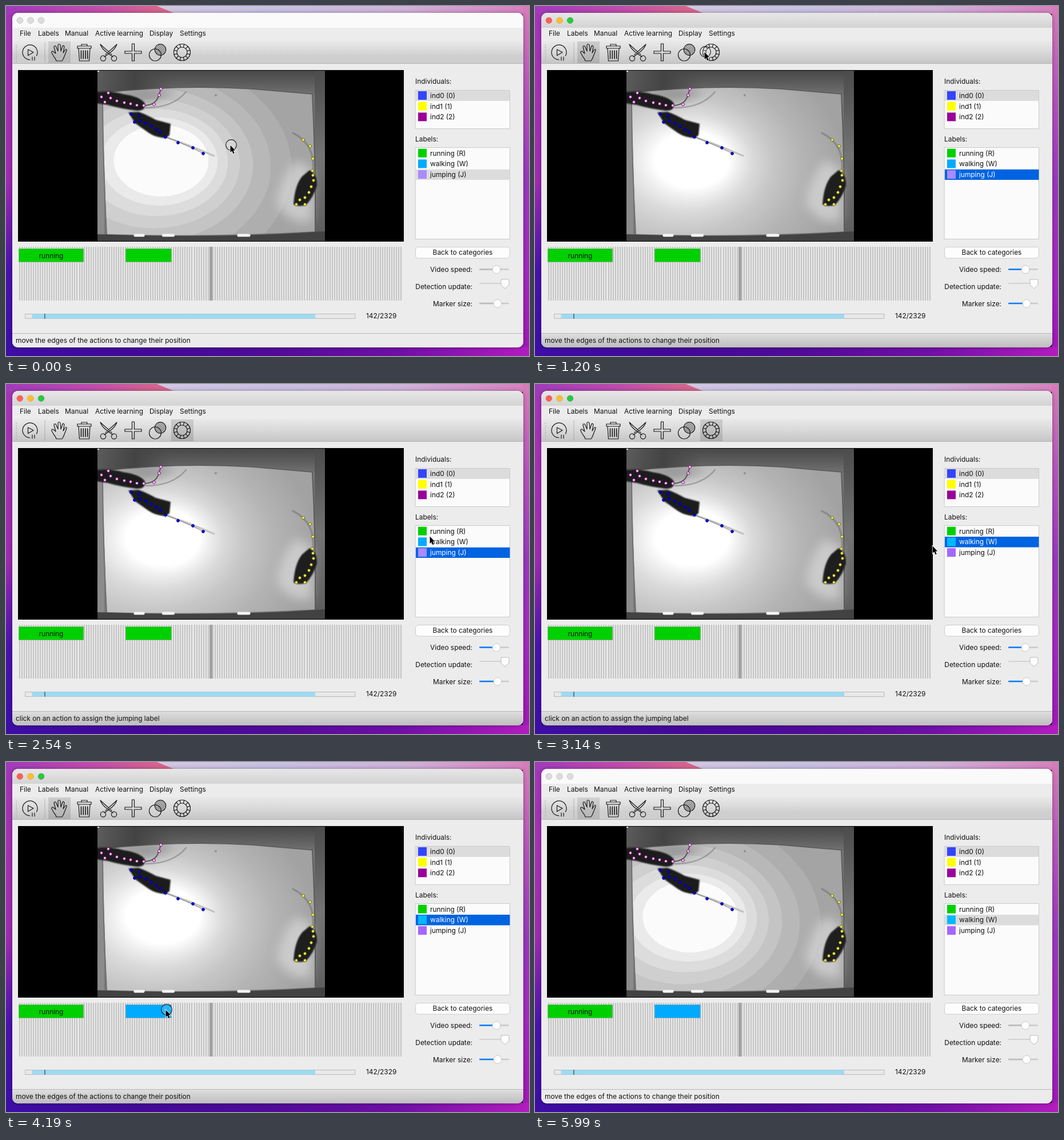
An HTML page with a canvas for the animation above (6090 ms loop, 915 px wide and 612 px high).

```html
<!DOCTYPE html>
<html lang="en">
<head>
<meta charset="utf-8">
<title>Action labelling</title>
<style>
html, body { margin: 0; width: 100%; height: 100%; overflow: hidden; background: #6a2fb0; }
canvas { display: block; }
</style>
</head>
<body>
<canvas id="stage" width="915" height="612"></canvas>
<script>
const W = 915, H = 612, LOOP = 6090;
let g = document.getElementById('stage').getContext('2d');

// ---------- helpers ----------
function box(x, y, w, h, fill, stroke, r = 0) {
  g.beginPath();
  g.roundRect(x, y, w, h, r);
  if (fill) { g.fillStyle = fill; g.fill(); }
  if (stroke) { g.strokeStyle = stroke; g.lineWidth = 1; g.stroke(); }
}
function dot(x, y, r, fill, stroke, width = 1) {
  g.beginPath();
  g.arc(x, y, r, 0, 7);
  if (fill) { g.fillStyle = fill; g.fill(); }
  if (stroke) { g.strokeStyle = stroke; g.lineWidth = width; g.stroke(); }
}
function shape(d, fill, stroke, width = 1.2) {
  const p = new Path2D(d);
  if (fill) { g.fillStyle = fill; g.fill(p); }
  if (stroke) { g.strokeStyle = stroke; g.lineWidth = width; g.stroke(p); }
}
function text(s, x, y, color = '#111', align = 'left') {
  g.font = '11.9px Inter, "Open Sans", sans-serif';
  g.textAlign = align;
  g.fillStyle = color;
  g.fillText(s, x, y);
}
function ramp(x0, y0, x1, y1, ...stops) {
  const r = g.createLinearGradient(x0, y0, x1, y1);
  stops.forEach((c, i) => r.addColorStop(i / (stops.length - 1), c));
  return r;
}
function offscreen(draw) {
  const c = document.createElement('canvas'), main = g;
  c.width = W; c.height = H;
  g = c.getContext('2d');
  g.lineJoin = g.lineCap = 'round';
  draw();
  g = main;
  return c;
}

// ---------- video ----------
const marks = [
  ['#ffd4fa', '#8c0088', [167,159, 173,168, 179,152, 183,161, 194,166, 207,169, 218,171, 229,173.5, 241,174, 259,172, 268,156, 271,145]],
  ['#0000ff', '#000070', [219,189, 233,192, 225,203, 235,201, 245,205, 254,210, 263,216, 270,221, 279,229, 301,239, 327,248, 345,258]],
  ['#ffff50', '#6a6a10', [520,234, 532,245, 537,267, 536,288, 537,296, 538,305, 534,316, 530,326, 523,335, 514,339, 508,347, 523,347]]
];

// Light falls off faster to the upper right; the idle picture is banded.
function glow(active) {
  const r = g.createRadialGradient(0, 0, 0, -45, 25, 240);
  const levels = active
    ? [[.2, 255], [.26, 240], [.36, 218], [.5, 198], [.7, 180], [1, 162]]
    : [[.26, 251], [.32, 234], [.39, 220], [.47, 207], [.56, 196], [.68, 184], [.82, 174], [1, 164]];
  let from = 0;
  for (const [to, v] of levels) {
    const c = `rgb(${v},${v},${v})`;
    if (!active || !from) r.addColorStop(from, c);
    r.addColorStop(to, c);
    from = to;
  }
  return r;
}

function drawVideo(active) {
  box(21, 112, 675, 300, '#000');
  g.save();
  g.beginPath(); g.rect(160, 113, 398, 298); g.clip();
  box(160, 113, 398, 298, '#777');
  box(160, 113, 398, 42, ramp(0, 113, 0, 152, '#484848', '#5a5a5a', '#6e6e6e'));
  box(160, 113, 130, 45, ramp(160, 0, 290, 0, '#5c5c5c', '#444', 'rgba(72,72,72,0)'));
  box(160, 150, 12, 255, '#8b8b8b');
  box(540, 113, 18, 298, ramp(0, 113, 0, 411, '#4c4c4c', '#747474', '#5c5c5c'));

  // arena floor
  g.save();
  g.clip(new Path2D('M168 152 Q300 137 430 145 L536 154 Q542 270 541 394 Q360 404 176 399 Z'));
  g.translate(287, 264);
  g.scale(1.33, 1);
  g.fillStyle = glow(active);
  g.fillRect(-200, -160, 400, 320);
  g.restore();
  g.filter = 'blur(9px)';
  shape('M508 270 Q480 300 474 345 Q496 385 535 376 L536 285 Z', 'rgba(220,220,220,.65)');
  shape('M160 142 L250 140 L300 150 L245 172 Z', 'rgba(70,70,70,.35)');
  g.filter = 'blur(.7px)';
  shape('M168 152 Q300 137 430 145 L536 154', null, '#5a5a5a', 1.4);
  shape('M536 154 Q542 270 541 394', null, '#5c5c5c', 2);
  shape('M169 170 Q170 290 176 399', null, '#707070', 2);
  shape('M160 399 Q370 407 558 394 L558 411 L160 411 Z', '#424242');
  for (const [x, w] of [[233, 19], [284, 22], [416, 23]]) box(x - w / 2, 398.5, w, 5, '#f4f4f4', null, 2);

  // tails
  shape('M245 178 Q292 178 315 150', null, 'rgba(90,90,90,.4)', 2.5);
  shape('M240 174 Q262 174 267 157 L271 145', null, '#555', 2);
  shape('M279 229 Q318 242 364 262', null, '#c2c2c2', 3);
  shape('M279 229 Q318 244 346 258', null, '#858585', 1.2);
  shape('M537 290 Q542 242 502 222', null, 'rgba(115,115,115,.55)', 3.5);
  // bodies
  g.filter = 'blur(1.2px)';
  shape('M158 150 Q185 148 205 154 Q234 158 243 170 Q245 184 228 183 Q198 179 178 173 L158 170 Z', '#1c1c1c');
  shape('M214 186 L232 185 Q246 190 262 199 L288 206 L286 226 L279 231 Q262 230 250 222 L226 205 Z', '#1c1c1c');
  shape('M531 287 Q545 294 544 314 Q538 334 525 348 Q511 352 503 347 Q505 314 518 298 Z', '#1e1e1e');
  g.filter = 'none';
  dot(367, 156, 2, 'rgba(80,80,80,.4)');
  box(160, 113, 3, 2, '#eee');
  g.restore();

  for (const [fill, edge, p] of marks)
    for (let i = 0; i < p.length; i += 2) dot(p[i], p[i + 1], 2.4, fill, edge);
}

// ---------- toolbar ----------
function drawIcons() {
  const ink = '#1a1a1a';
  for (let y = 68; y < 97; y += 4) box(17.5, y, 1.5, 1.5, '#aaa');
  for (let y = 64; y < 99; y += 3) box(67.5, y, 1, 1.3, '#777');

  // play
  shape('M42 94 A13 13 0 1 1 53.5 87', null, ink);
  shape('M38.5 76 L48 81 L38.5 86.5 Z M46 89 V95 M50 89 V95', null, ink);
  // hand
  shape('M88 96 q-1 -4 -4 -7 l-4 -7 q-1 -3 2 -3 l5 4 l-3 -11 q0 -3 3 -2 l4 9 l0 -11 q1 -3 4 0 l1 11 l3 -9 q2 -2 3 1 l-2 11 l4 -6 q3 -1 2 2 l-4 10 q-1 4 -4 8 Z', null, ink);
  // bin
  shape('M125 70 H149 V74 H125 Z M132 70 V67 H142 V70 M127 74 L128.5 96 H145.5 L147 74', null, ink);
  shape('M131.5 78 V92 M135.3 78 V92 M139 78 V92 M142.7 78 V92', null, ink, 1.6);
  // scissors
  shape('M165 67 Q168 76 180 84 L187 89 M165 67 L185 85 M194 67 Q191 76 179 84 L172 89 M194 67 L174 85', null, ink);
  for (const x of [170, 189]) dot(x, 91.5, 4.6, null, ink, 1.2);
  // plus
  shape('M220.5 66 H224.5 V79 H237 V83 H224.5 V96 H220.5 V83 H208 V79 H220.5 Z', null, ink);
  // overlapping discs
  dot(261, 85.5, 10.5, null, ink, 1.2);
  g.save();
  g.beginPath(); g.arc(270, 76.5, 9.8, 0, 7); g.clip();
  for (let i = -18; i < 20; i += 3.2) shape(`M${260 + i} 88 l24 -24`, null, ink, 1);
  g.restore();
  dot(270, 76.5, 9.8, null, ink, 1.2);
  // wheel
  dot(308, 81, 14.5, null, ink, 1.2);
  dot(308, 81, 9, null, ink, 1.2);
  for (let i = 0; i < 12; i++) {
    const a = i * Math.PI / 6 + .26, c = Math.cos(a), s = Math.sin(a);
    shape(`M${308 + 9 * c} ${81 + 9 * s} L${308 + 14.5 * c} ${81 + 14.5 * s}`, null, ink);
  }
}

// ---------- window ----------
function drawWallpaper() {
  box(0, 0, 14, H, ramp(0, 0, 0, H, '#a536ba', '#a82fb4', '#a02ab4', '#4a12ae', '#3a0ea8'));
  box(0, 0, 300, 14, ramp(0, 0, 300, 0, '#a13abb', '#c04cae', '#dd6c86'));
  shape('M264 0 H915 V14 H298 Z', ramp(264, 0, 915, 0, '#d3c8e4', '#c9c0e2', '#d0b2da', '#d87fc0'));
  box(904, 0, 11, H, ramp(0, 0, 0, H, '#d87cba', '#b754bd', '#9a37c0', '#a528c2', '#a116b8'));
  box(0, 596, W, 16, ramp(0, 0, W, 0, '#3d0da6', '#430898', '#500a98', '#6f0fa6', '#b31cc0'));
}

function drawSlider(y, x, active) {
  box(828, y - 1.2, 52, 2.4, '#c9c9c9', null, 1.2);
  box(828, y - 1.2, x - 828, 2.4, active ? '#0a7cff' : '#bcbcbc', null, 1.2);
  dot(x, y + .3, 7, '#fdfdfd', '#bdbdbd', .8);
}

function drawFrame(active) {
  drawWallpaper();
  g.shadowColor = 'rgba(0,0,0,.35)'; g.shadowBlur = 7;
  box(11, 12, 894, 585, '#ececec', null, 10);
  g.shadowBlur = 0; g.shadowColor = 'transparent';
  g.save();
  g.beginPath(); g.roundRect(11, 12, 894, 585, 10); g.clip();
  box(11, 12, 894, 26, active ? ramp(0, 12, 0, 38, '#e7e7e7', '#d3d3d3') : '#fafafa');
  box(11, 61, 894, 39.5, active
    ? ramp(0, 61, 0, 100, '#e9e9e9', '#d9d9d9', '#c6c6c6')
    : ramp(0, 61, 0, 100, '#e9e9e9', '#dedede', '#cfcfcf', '#cecece'));
  box(11, 100, 894, 1, '#b2b2b2');
  box(11, 573, 894, 24, active ? ramp(0, 573, 0, 597, '#dedede', '#bdbdbd') : '#ebebeb');
  box(11, 572, 894, 1, '#b8b8b8');
  g.restore();

  ['#ff5f57', '#febc2e', '#28c840'].forEach((c, i) =>
    dot(24.3 + 18.6 * i, 25.2, 5.5, active ? c : '#dcdcdc', active ? 'rgba(0,0,0,.13)' : '#c4c4c4', .8));
  [['File', 24], ['Labels', 56], ['Manual', 103], ['Active learning', 156], ['Display', 251], ['Settings', 304]]
    .forEach(([s, x]) => text(s, x, 52));

  drawVideo(active);

  // timeline
  box(22, 421, 671, 94, '#e9e9e9');
  for (let i = 0; i < 167; i++) box(Math.round(23 + i * 4.02), 421, 2, 94, '#c4c4c4');
  box(356, 421, 5, 94, '#a2a2a2');

  // progress
  box(34, 538.5, 577, 8, '#e8e8e8', '#b9b9b9');
  box(45.5, 538.5, 495.5, 8, '#9edaf2');
  box(67, 538, 1.8, 9, '#567380');
  text('142/2329', 630, 546);

  // side panel
  text('Individuals:', 716, 136);
  text('Labels:', 716, 236.5);
  box(716.5, 147.5, 165, 67, '#fbfbfb', '#c9c9c9');
  box(716.5, 247.5, 165, 160, '#fbfbfb', '#c9c9c9');
  box(717, 148, 164, 18, '#dcdcdc');
  ['#3344ff', '#ffff00', '#990099'].forEach((c, i) => {
    box(721, 149 + 18.7 * i, 15, 15, c);
    text(`ind${i} (${i})`, 742, 161 + 18.7 * i);
  });
  box(716.5, 421.5, 165, 19.5, '#fdfdfd', '#cbcbcb', 5);
  text('Back to categories', 799, 435.3, '#111', 'center');
  text('Video speed:', 816, 465, '#111', 'right');
  text('Detection update:', 816, 495, '#111', 'right');
  text('Marker size:', 816, 524.5, '#111', 'right');
  drawSlider(460.5, 858, active);
  drawSlider(520, 860, active);
  box(828, 484, 46, 2, '#d2d2d2', null, 1);
  shape('M867 478 H879 Q880 478 880 480 V488 L873 494 L866 488 V480 Q866 478 867 478 Z', '#fdfdfd', '#b5b5b5', .9);
}

const idle = offscreen(() => drawFrame(false));
const live = offscreen(() => drawFrame(true));
const icons = offscreen(drawIcons);

// ---------- motion ----------
const route = [[0,392,243], [450,392,243], [1050,296,80], [1640,296,80], [2540,741,266],
  [2990,741,266], [3740,299,428], [4040,279,433], [4790,279,433], [5090,688,411]];
const presses = [0, 1190, 2690, 4190];

function pointer(t) {
  const i = route.findIndex(k => k[0] > t);
  if (i < 0) return route.at(-1).slice(1);
  const [t0, x0, y0] = route[i - 1], [t1, x1, y1] = route[i];
  const p = (t - t0) / (t1 - t0), e = p * p * (3 - 2 * p);
  return [x0 + (x1 - x0) * e, y0 + (y1 - y0) * e];
}

function drawPointer(t) {
  const [x, y] = pointer(t);
  if (presses.some(p => t >= p && t < p + 150)) {
    dot(x + 2, y, 9.3, 'rgba(255,255,255,.15)', '#222', 1.2);
  }
  g.save();
  g.translate(x, y);
  const arrow = 'M.5 .5 V13 L3.4 10.4 L5.5 15.3 L7.7 14.3 L5.6 9.6 H9.3 Z';
  shape(arrow, null, '#fff', 1.6);
  shape(arrow, '#000');
  g.restore();
}

function drawLabels(active, chosen) {
  const rows = [['running (R)', '#00d000'], ['walking (W)', '#00aaff', '#00b8ff'], ['jumping (J)', '#a566ff', '#a98aff']];
  rows.forEach(([name, color, picked], i) => {
    const y = 248 + 18.7 * i, on = i === chosen;
    if (on) box(717, y + .3, 164.5, 18.4, active ? '#0063e1' : '#dcdcdc');
    box(721, y + 1.7, 15, 15, on ? picked : color);
    text(name, 742, y + 13.5, on && active ? '#fff' : '#111');
  });
}

function draw(t) {
  const active = t >= 1190 && t < 5990;
  const assigned = t >= 4190;
  const dragging = t < 1340 || assigned;
  g.drawImage(active ? live : idle, 0, 0);
  box(dragging ? 74 : 289, 62, 39, 38, active ? 'rgba(0,0,0,.12)' : 'rgba(0,0,0,.1)');
  g.drawImage(icons, 0, 0);
  drawLabels(active, t < 2690 ? 2 : 1);

  box(22.5, 424.5, 113, 23, '#00d000', '#6fb86f');
  text('running', 79, 440.5, '#111', 'center');
  box(209.5, 424.5, 80, 23, assigned ? '#00aaff' : '#00d000', assigned ? '#76a9c2' : '#6fb86f');

  const status = dragging ? 'move the edges of the actions to change their position'
    : t < 3890 ? 'click on an action to assign the jumping label' : '';
  text(status, 17, 589);
  if (t < 5240) drawPointer(t);
}

// The picture advances in 150 ms steps, with one short step before the first press.
function step(t) {
  const start = t < 1190 ? 0 : 1190;
  return start + Math.floor((t - start) / 150) * 150;
}

const begin = performance.now();
function tick() {
  draw(step((performance.now() - begin) % LOOP));
  requestAnimationFrame(tick);
}
tick();
</script>
</body>
</html>
```
